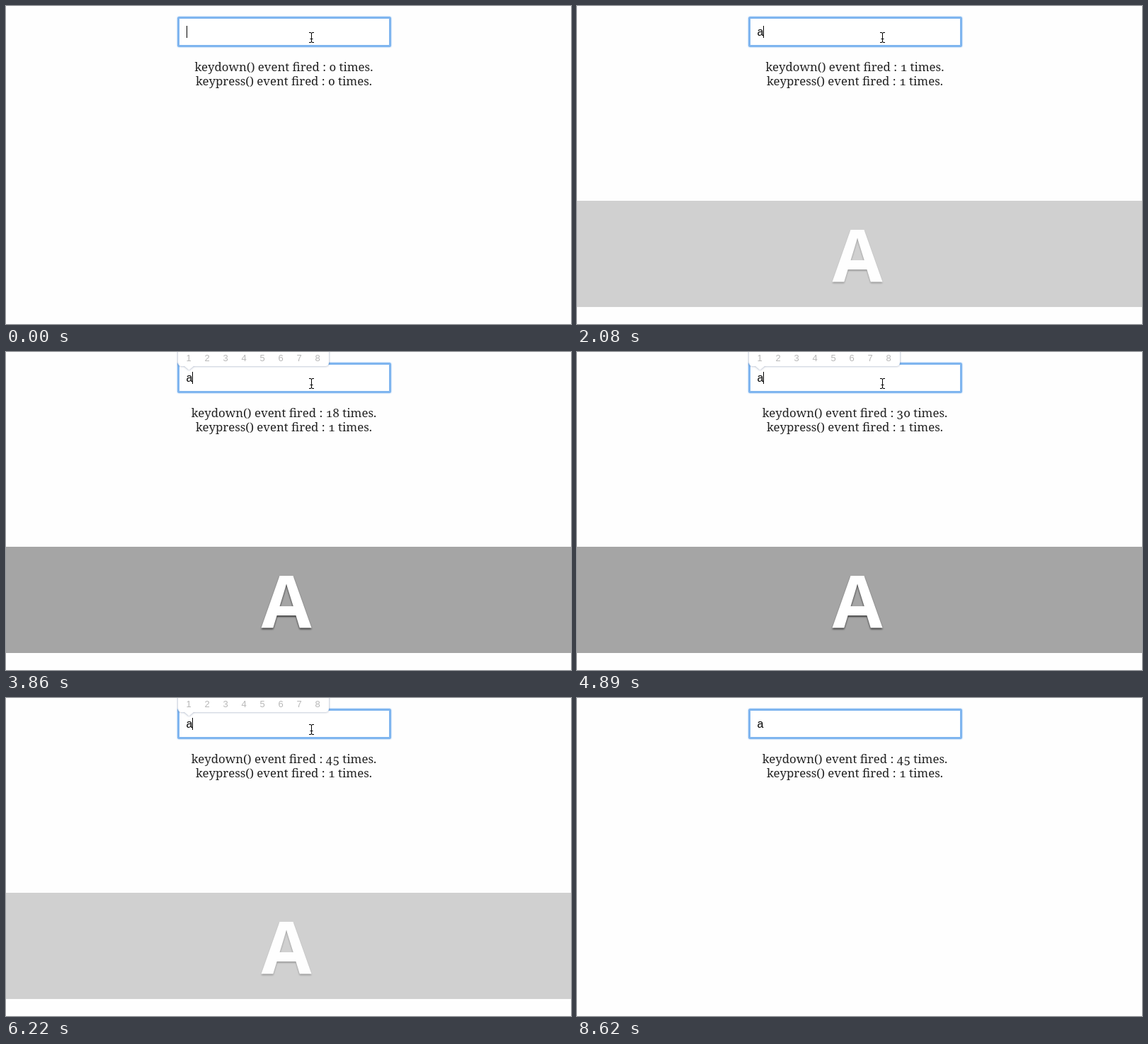
Recreate the animation shown at these times as an HTML page. Size 798x449 px, loop 8720 ms.

```html
<!DOCTYPE html>
<html lang="en">
<head>
<meta charset="utf-8">
<title>Key events</title>
<style>
  html, body { margin: 0; width: 100%; height: 100%; overflow: hidden; background: #fefefe; }
  svg { display: block; }
  .field { fill: #fff; stroke: #7fb5ef; stroke-width: 3; filter: drop-shadow(0 0 1px #9cc7f6); }
  .typed { font: 16px "Liberation Sans", Arial, sans-serif; }
  .log { font: 16.8px "Noto Serif", serif; font-variant-numeric: oldstyle-nums; fill: #222; text-anchor: middle; }
  .letter { font: 700 103px "Open Sans", sans-serif; fill: #fff; text-anchor: middle;
    filter: drop-shadow(0 2px 1px rgba(0, 0, 0, .6)); }
  .bubble { fill: #fff; filter: drop-shadow(0 0 1.5px rgba(70, 90, 130, .6)); }
  .digits { font: 13px "Liberation Sans", Arial, sans-serif; fill: #b8b8b8; text-anchor: middle; }
</style>
</head>
<body>
<svg width="798" height="449" viewBox="0 0 798 449">
  <rect class="field" x="243.5" y="16.5" width="299" height="40" rx="1"/>
  <text class="typed" id="typed" x="254.5" y="42">a</text>

  <text class="log" id="down" x="392.5" y="92"></text>
  <text class="log" id="press" x="392.5" y="112"></text>

  <g id="band">
    <rect y="275" width="798" height="150" fill="rgba(0,0,0,.353)"/>
    <text class="letter" x="396" y="389">A</text>
  </g>

  <g id="popup">
    <path class="bubble" d="M243 -10H456V15Q456 20 451 20H265L258.500 25.500L252 20H248Q243 20 243 15Z"/>
    <g class="digits" id="digits"></g>
  </g>

  <rect id="caret" y="28" width="1" height="17"/>

  <g id="beam" fill="none">
    <path id="beamShape" d="M428 37.500H430Q431.500 37.500 431.500 39V50Q431.500 51.500 430 51.500H428M435 37.500H433Q431.500 37.500 431.500 39M431.500 50Q431.500 51.500 433 51.500H435M429.500 46.500H433.500"
      stroke="#000"/>
  </g>
  <path id="arrow" d="M0 0V15.500L3.600 12.200L6 17.800L8.600 16.700L6.200 11.200H11Z" fill="#000" stroke="#fff"/>
</svg>
<script>
  const LOOP = 8720;
  const KEY_DOWN = 1930, REPEAT = 2530, KEY_UP = 6220, CLOSE = 8620;
  const BLINKS = [0, 450, 1040, 1490, KEY_DOWN, 6670, 7120, 7570, 8160, CLOSE];
  const EXIT = [7420, 7570, 7720, 7870, 8010, 8160];
  const FROM = [431, 44], TO = [772, 434];

  const el = id => document.getElementById(id);
  const show = (id, on) => el(id).setAttribute("visibility", on ? "visible" : "hidden");
  const passed = (times, t) => times.filter(time => time <= t).length;

  // Screen refreshes while the key repeats, about 148 ms apart
  const refreshes = Array.from({ length: 26 }, (_, i) => 10 * Math.round(252.9 + 14.77 * i));

  el("digits").innerHTML = Array.from({ length: 8 }, (_, i) =>
    `<text x="${258 + 26 * i}" y="13">${i + 1}</text>`).join("");

  function keydowns(t) {
    if (t < KEY_DOWN) return 0;
    if (t < REPEAT) return 1;
    const last = refreshes[passed(refreshes, t) - 1];
    return Math.min(45, Math.floor(18 + (last - 3860) / 84));
  }

  function bandOpacity(t) {
    if (t < 2080 || t >= 6370) return 0;
    return t < 2230 || t >= KEY_UP ? 0.51 : 1;
  }

  function setLog(id, count) {
    const line = `key${id}() event fired : ${count} times.`;
    if (el(id).textContent !== line) el(id).textContent = line;
  }

  function movePointer(t) {
    const step = passed(EXIT, t);
    const p = Math.min(1, step / 5);
    const ease = p * p * (3 - 2 * p);
    const [x, y] = FROM.map((from, i) => from + (TO[i] - from) * ease);
    show("beam", step === 0);
    show("arrow", step > 0 && step < EXIT.length);
    el("arrow").setAttribute("transform", `translate(${x} ${y})`);
  }

  function draw(t) {
    const typed = t >= KEY_DOWN;
    show("typed", typed);
    show("caret", passed(BLINKS, t) % 2 === 1);
    el("caret").setAttribute("x", typed ? 263 : 255);
    setLog("down", keydowns(t));
    setLog("press", typed ? 1 : 0);
    el("band").setAttribute("opacity", bandOpacity(t));
    show("popup", t >= REPEAT && t < CLOSE);
    movePointer(t);
  }

  const start = performance.now();
  function tick() {
    draw((performance.now() - start) % LOOP);
    requestAnimationFrame(tick);
  }
  tick();
</script>
</body>
</html>
```
